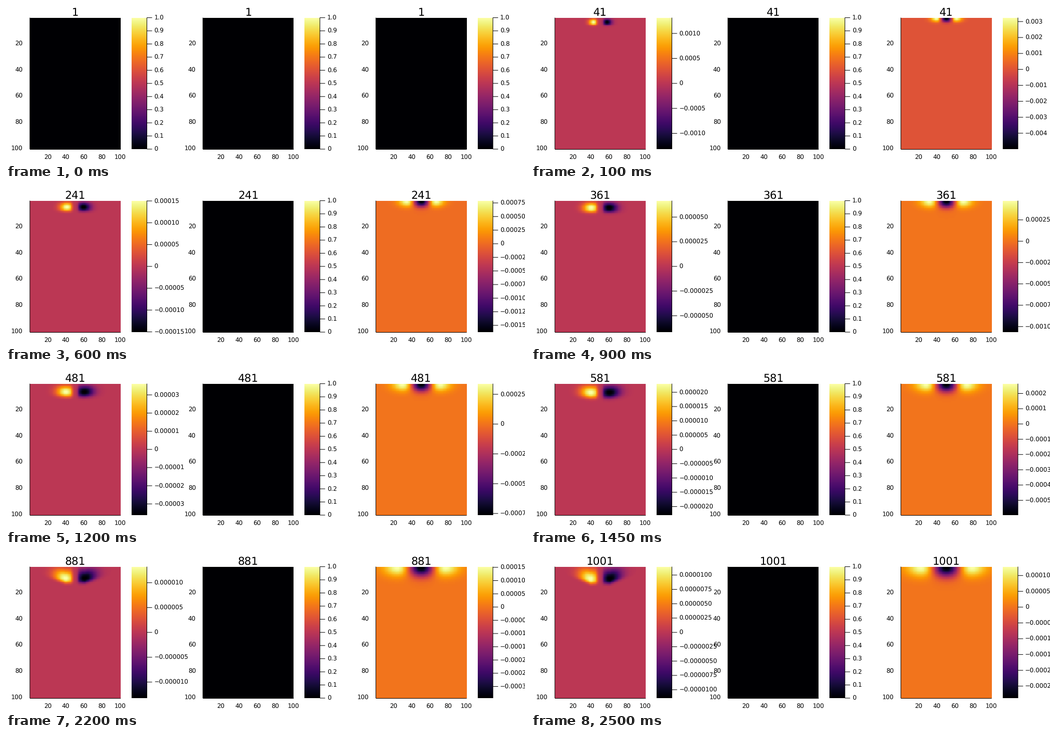
Recreate the animation shown at these times as a matplotlib script. Size 1000 by 300 pixels, loop 2.55 s.

```python
import numpy as np
import matplotlib.pyplot as plt
from matplotlib.animation import FuncAnimation

W, H = 1000, 300
FRAMES, INTERVAL, STRIDE = 51, 50, 20
PX = 0.72                      # points per pixel at 100 dpi
TOP, BOTTOM = 22.6, 277.0
PANEL = W / 3

plt.rcParams["font.family"] = "DejaVu Sans"
plt.rcParams["text.hinting"] = "none"
fig = plt.figure(figsize=(W / 100, H / 100), dpi=100, facecolor="white")
ax = fig.add_axes([0, 0, 1, 1])

col, row = np.meshgrid(np.arange(1, 101), np.arange(1, 101))
dx = col - 50.5
RAMP = np.linspace(1, 0, 256)[:, None]

# Fitted keys over simulation steps; everything decays smoothly in sqrt(step)
KEYS = np.sqrt([20, 100, 360, 580, 720, 880, 1000])


def key(n, *values):
    return np.interp(np.sqrt(n), KEYS, values)


def log_key(n, *values):
    return np.exp(key(n, *np.log(values)))


def dipole(n):
    """Antisymmetric pair of lobes sinking from the top edge."""
    amp = log_key(n, 2.05e-3, 5.45e-4, 6.66e-5, 2.3e-5, 1.628e-5, 1.323e-5, 1.146e-5)
    x0 = key(n, 7, 7.8, 10, 10.5, 10.6, 10.6, 10.6)
    y0 = key(n, 3.4, 4.1, 5.4, 6.8, 7.8, 9.2, 9.7)
    gap = key(n, 4.5, 4.5, 4.2, 3.8, 3.7, 3.7, 3.7)
    inner = key(n, 4, 4.6, 7, 8.5, 8.5, 7.5, 7)
    outer = key(n, 3.6, 4.3, 6.5, 8, 8.5, 9, 9)
    up = key(n, 1.7, 1.9, 2.6, 3.4, 3.9, 4.6, 5)
    down = key(n, 2.2, 2.8, 3.9, 4.5, 4.3, 3.6, 3.6)
    tilt = key(n, 0, 0, 0, 0.06, 0.12, 0.2, 0.24)

    d = np.abs(dx) - x0
    v = row - y0 + tilt * np.maximum(d, 0)
    across = np.exp(-0.5 * (d / np.where(d < 0, inner, outer)) ** 2)
    along = np.where(v < 0, np.exp(-0.5 * (v / up) ** 2), np.exp(-np.abs(v / down) ** 3))
    f = np.tanh((dx / gap) ** 2) * across * along
    f /= f.max()
    f[f < 0.004] = 0
    return -np.sign(dx) * f * amp, -amp, amp


def ripple(n):
    """Second derivative of a spreading Gaussian, fading with depth."""
    low = log_key(n, 6.3e-3, 3.16e-3, 1.065e-3, 5.97e-4, 4.48e-4, 3.44e-4, 2.88e-4)
    high = log_key(n, 4.4e-3, 1.77e-3, 4.75e-4, 2.64e-4, 2.003e-4, 1.525e-4, 1.28e-4)
    q = dx ** 2 / (32 + 0.237 * n)
    depth = (row - 1) ** 2 / (2.2 + 0.022 * n)
    f = (q - 1) * np.exp(-0.5 * (q + depth))
    return np.where(f < 0, f / -f.min() * low, f / f.max() * high), -low, high


def blank(n):
    return np.zeros((100, 100)), 0, 1


def ticks(lo, hi):
    """Finest round step that gives ten ticks or fewer."""
    if lo == 0:
        return np.arange(11) / 10, 1
    for e in range(8, 0, -1):
        for m, extra in ((1, 0), (2.5, 1), (5, 0)):
            step = m * 10.0 ** -e
            a, b = np.ceil(lo / step), np.floor(hi / step)
            if b - a < 10:
                return np.arange(a, b + 1) * step, e + extra


def label(x, y, s, size=11.7, ha="center"):
    ax.text(x, y + 0.365 * size, s, fontsize=size * PX, ha=ha, va="baseline")


def line(x, y):
    ax.plot(x, y, color="black", lw=PX, solid_capstyle="butt", snap=False)


def image(data, x0, x1, lo, hi):
    ax.imshow(data, extent=(round(x0), round(x1), round(BOTTOM), round(TOP)),
              cmap="inferno", vmin=lo, vmax=hi, aspect="auto", interpolation="nearest")


def panel(x, n, field):
    data, lo, hi = field(n)
    left, right = x + 46, x + 221
    image(data, left, right, lo, hi)
    line([left, left], [TOP, BOTTOM])
    line([left, right], [BOTTOM + 0.5] * 2)
    for v in range(20, 101, 20):
        f = (v - 0.5) / 100
        label(left + f * (right - left), 293, str(v))
        label(x + 32.5, TOP + f * (BOTTOM - TOP), str(v), ha="right")
    label(x + 133.5, 11.5, str(n + 1), 20.8)

    bar = x + 271.5
    image(RAMP, x + 242, bar, 0, 1)
    line([bar, bar], [TOP, BOTTOM])
    values, digits = ticks(lo, hi)
    for v in values:
        y = BOTTOM - (v - lo) / (hi - lo) * (BOTTOM - TOP)
        line([bar, bar + 10], [y, y])
        text = "0" if abs(v) < 1e-12 else f"{v:.{digits}f}".replace("-", "\u2212")
        label(bar + 14, y, text, ha="left")


def draw(i):
    ax.clear()
    n = i * STRIDE
    for k, field in enumerate((dipole, blank, ripple)):
        panel(k * PANEL, n, field if n else blank)
    ax.set_xlim(0, W)
    ax.set_ylim(H, 0)
    ax.axis("off")
    return []


anim = FuncAnimation(fig, draw, frames=FRAMES, interval=INTERVAL,
                     init_func=lambda: [], repeat=True, repeat_delay=0)
plt.show()
```
